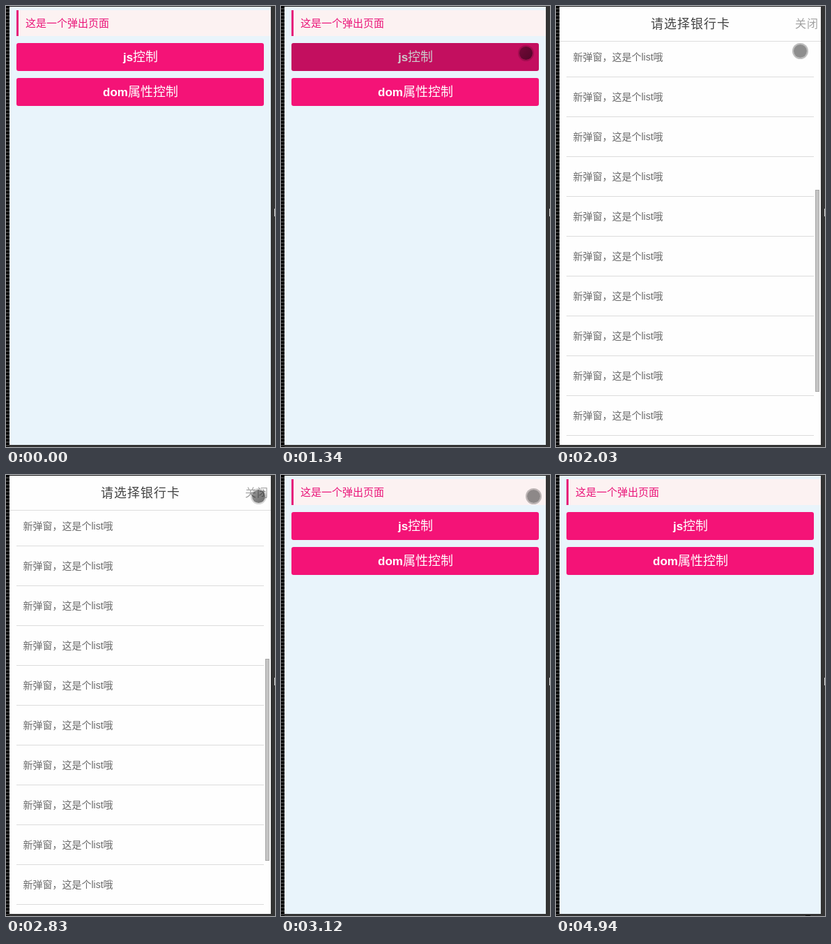
Animation of 386x631 px, one loop 5040 ms. Source, as an HTML page:

```html
<!DOCTYPE html>
<html lang="zh-CN">
<head>
<meta charset="utf-8">
<title>弹出页面</title>
<style>
  * { box-sizing: border-box; margin: 0; padding: 0; }
  html, body { width: 386px; height: 631px; overflow: hidden; background: #333; }
  body {
    position: relative;
    font: 300 14px "Liberation Sans", "Noto Sans CJK SC", "Noto Sans CJK", sans-serif;
    white-space: nowrap;
  }
  body * { position: absolute; }
  b, .list li { position: static; }

  .edge {
    left: 0; top: 0; width: 5px; height: 631px;
    background: repeating-linear-gradient(#000 0 3px, #3a3a3a 3px 5px);
  }
  .top { left: 5px; top: 0; width: 375px; height: 1px; background: #1c1c1c; }
  .mark { left: 385px; top: 290px; width: 1px; height: 11px; background: #ddd; }

  .phone {
    left: 5px; top: 1px; width: 375px; height: 627px;
    overflow: hidden; background: #e9f4fb;
  }
  .note {
    left: 10px; top: 5px; width: 365px; height: 37px; padding-left: 10px;
    border-left: 3px solid #e6177a; background: #fcf2f2;
    color: #ea1579; font-size: 15px; line-height: 37px;
  }
  .btn {
    left: 10px; width: 355px; height: 40px; border-radius: 3px;
    overflow: hidden; background: #f41377; color: #fff;
    font-size: 18px; line-height: 40px; text-align: center; text-indent: 1px;
  }
  .btn b { font-size: 17px; }
  .shade { inset: 0; background: rgba(0, 0, 0, .2); }

  .panel { left: 0; top: 0; width: 375px; height: 627px; background: #fefefe; }
  .head {
    left: 0; top: 0; width: 375px; height: 50px;
    border-bottom: 1px solid #ddd; letter-spacing: 1px; line-height: 50px;
  }
  .head h1 { left: 131px; font-size: 18px; font-weight: 300; color: #444; }
  .head span { left: 338px; font-size: 16px; color: #a2a2a2; }
  .list { left: 10px; top: 44px; width: 355px; list-style: none; }
  .list li {
    height: 57px; padding-left: 9.5px; border-bottom: 1px solid #dcdcdc;
    color: #6a6a6a; line-height: 56px;
  }
  .bar {
    left: 367px; top: 262px; width: 6px; height: 289px;
    background: #c4c4c4; border: 1px solid #a8a8a8;
  }

  .touch { left: -5px; top: -1px; width: 23px; height: 23px; }
  .touch i { inset: 2px; border-radius: 50%; }
  .up { background: rgba(0, 0, 0, .44); box-shadow: 0 0 0 2px rgba(0, 0, 0, .25); }
  .down {
    background: linear-gradient(135deg, rgba(0, 0, 0, .4), rgba(0, 0, 0, .58));
    box-shadow: 0 0 0 2px rgba(0, 0, 0, .16);
  }
  .tip { background: #000; height: 1px; }
  .side { left: 385px; top: 53px; width: 1px; }
  .foot { left: 358px; top: 630px; width: 7px; }

  .shade, .panel, .touch, .up, .down, .tip { animation: 5040ms step-end infinite; }
  .shade { animation-name: shade; }
  .panel { animation-name: slide; }
  .touch { animation-name: move; }
  .up { animation-name: up; }
  .down { animation-name: down; }
  .side { animation-name: side; }
  .foot { animation-name: foot; }

  @keyframes shade {
    0%, 29.36%, 100% { opacity: 0; }
    26.58% { opacity: 1; }
  }
  @keyframes slide {
    0%, 61.9%, 100% { transform: translateX(375px); }
    29.36% { transform: translateX(60px); }
    31.74% { transform: none; }
    58.92% { transform: translateX(144px); }
  }
  @keyframes move {
    0%, 69.84%, 93.05%, 100% { transform: translate(-40px, 0); }
    15.47% { transform: translate(349px, 58px); }
    17.85% { transform: translate(340px, 56px); }
    40.27% { transform: translate(339px, 53px); }
    42.65% { transform: translate(342px, 42px); }
    45.03% { transform: translate(347px, 25px); }
    48.01% { transform: translate(351px, 19px); }
    67.46% { transform: translate(358px, 28px); }
    87.1% { transform: translate(358px, 591px); }
    90.07% { transform: translate(339px, 601px); }
  }
  @keyframes up {
    0%, 29.36%, 61.9%, 100% { opacity: 1; }
    26.58%, 56.15% { opacity: 0; }
  }
  @keyframes down {
    0%, 29.36%, 61.9%, 100% { opacity: 0; }
    26.58%, 56.15% { opacity: 1; }
  }
  @keyframes side {
    0%, 72.81%, 100% { opacity: 0; }
    69.84% { opacity: 1; }
  }
  @keyframes foot {
    0%, 100% { opacity: 0; }
    98.01% { opacity: 1; }
  }
</style>
</head>
<body>
  <div class="edge"></div>
  <div class="top"></div>
  <div class="mark"></div>
  <div class="phone">
    <div class="note">这是一个弹出页面</div>
    <div class="btn" style="top:52px"><b>js</b>控制<div class="shade"></div></div>
    <div class="btn" style="top:102px"><b>dom</b>属性控制</div>
    <div class="panel">
      <ul class="list">
        <li>新弹窗，这是个list哦</li>
        <li>新弹窗，这是个list哦</li>
        <li>新弹窗，这是个list哦</li>
        <li>新弹窗，这是个list哦</li>
        <li>新弹窗，这是个list哦</li>
        <li>新弹窗，这是个list哦</li>
        <li>新弹窗，这是个list哦</li>
        <li>新弹窗，这是个list哦</li>
        <li>新弹窗，这是个list哦</li>
        <li>新弹窗，这是个list哦</li>
      </ul>
      <div class="head"><h1>请选择银行卡</h1><span>关闭</span></div>
      <div class="bar"></div>
    </div>
    <div class="touch"><i class="up"></i><i class="down"></i></div>
  </div>
  <div class="tip side"></div>
  <div class="tip foot"></div>
</body>
</html>
```
